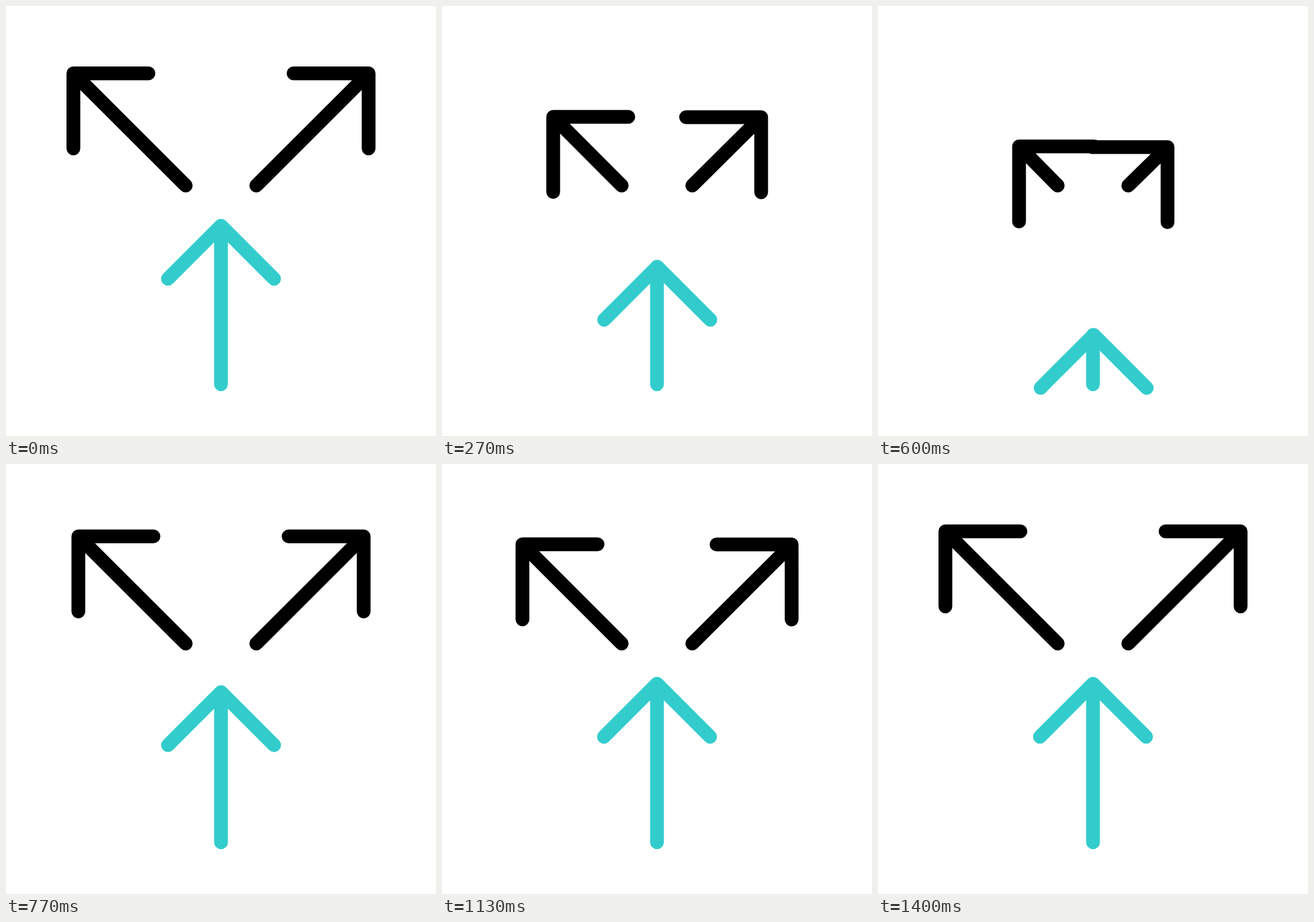
Write an HTML page that moves like this. It is 640 px wide and 640 px high and loops after 2 s.

```html
<!DOCTYPE html>
<html lang="en">
<head>
<meta charset="utf-8">
<title>Arrows</title>
<style>
  html, body { margin: 0; width: 100%; height: 100%; overflow: hidden; background: #fff; }
  svg { display: block; width: 100%; height: 100%; }
  path { fill: none; stroke-width: 20.5; stroke-linecap: round; stroke-linejoin: round; }
</style>
</head>
<body>
<svg viewBox="0 0 640 640">
  <path id="left" stroke="#000"/>
  <path id="right" stroke="#000"/>
  <path id="up" stroke="#3cc"/>
</svg>
<script>
const LOOP = 2000;
const LANDING = 22.67; // step at which the heads hit their rest position
const [left, right, up] = ['left', 'right', 'up'].map(id => document.getElementById(id));

// Cubic bezier easing with horizontal handles, solved by bisection
function ease(x, x1, x2) {
  let lo = 0, hi = 1, s;
  for (let i = 0; i < 24; i++) {
    s = (lo + hi) / 2;
    const bx = 3 * x1 * s * (1 - s) ** 2 + 3 * x2 * s * s * (1 - s) + s ** 3;
    if (bx < x) lo = s; else hi = s;
  }
  return s * s * (3 - 2 * s);
}

// Pull back to `depth` at step `peak`, snap home, then bounce
function offset(n, { depth, peak, x1, x2, gravity, bounce, decay, count }) {
  if (n <= peak) return depth * ease(n / peak, x1, x2);
  if (n <= LANDING) return depth * (1 - ((n - peak) / (LANDING - peak)) ** 2);
  let t = n - LANDING;
  for (let i = 0; i < count; i++) {
    if (t < bounce) return gravity * t * (bounce - t);
    t -= bounce;
    bounce *= decay;
  }
  return 0;
}

const diagonal = { depth: 120, peak: 16, x1: .33, x2: .6, gravity: 2.46, bounce: 9.41, decay: .64, count: 3 };
const vertical = { depth: 167.6, peak: 17, x1: .42, x2: .75, gravity: 3.5, bounce: 11.1, decay: .64, count: 1 };

function corner(x, y, dir) {
  return `M${x + dir * 111.75} ${y}H${x}V${y + 111.75}M${x} ${y}L${320 - dir * 52.5} 267.3`;
}

// 30 steps per second, each starting on a multiple of 10 ms
function stepAt(ms) {
  const n = Math.ceil(ms * .03);
  return Math.round(n * 10 / 3) * 10 > ms ? n - 1 : n;
}

const start = performance.now();
function draw() {
  const n = stepAt((performance.now() - start) % LOOP);
  const d = offset(n, diagonal), e = offset(n, vertical);
  left.setAttribute('d', corner(100.3 + d * 1.004, 100.3 + d * .996, 1));
  right.setAttribute('d', corner(539.7 - d * .996, 100.3 + d * 1.004, -1));
  const x = 320 + e * .006, y = 327 + e;
  up.setAttribute('d', `M${x - 79} ${y + 79}L${x} ${y}L${x + 79} ${y + 79}M320 ${y}V563`);
  requestAnimationFrame(draw);
}
draw();
</script>
</body>
</html>
```
